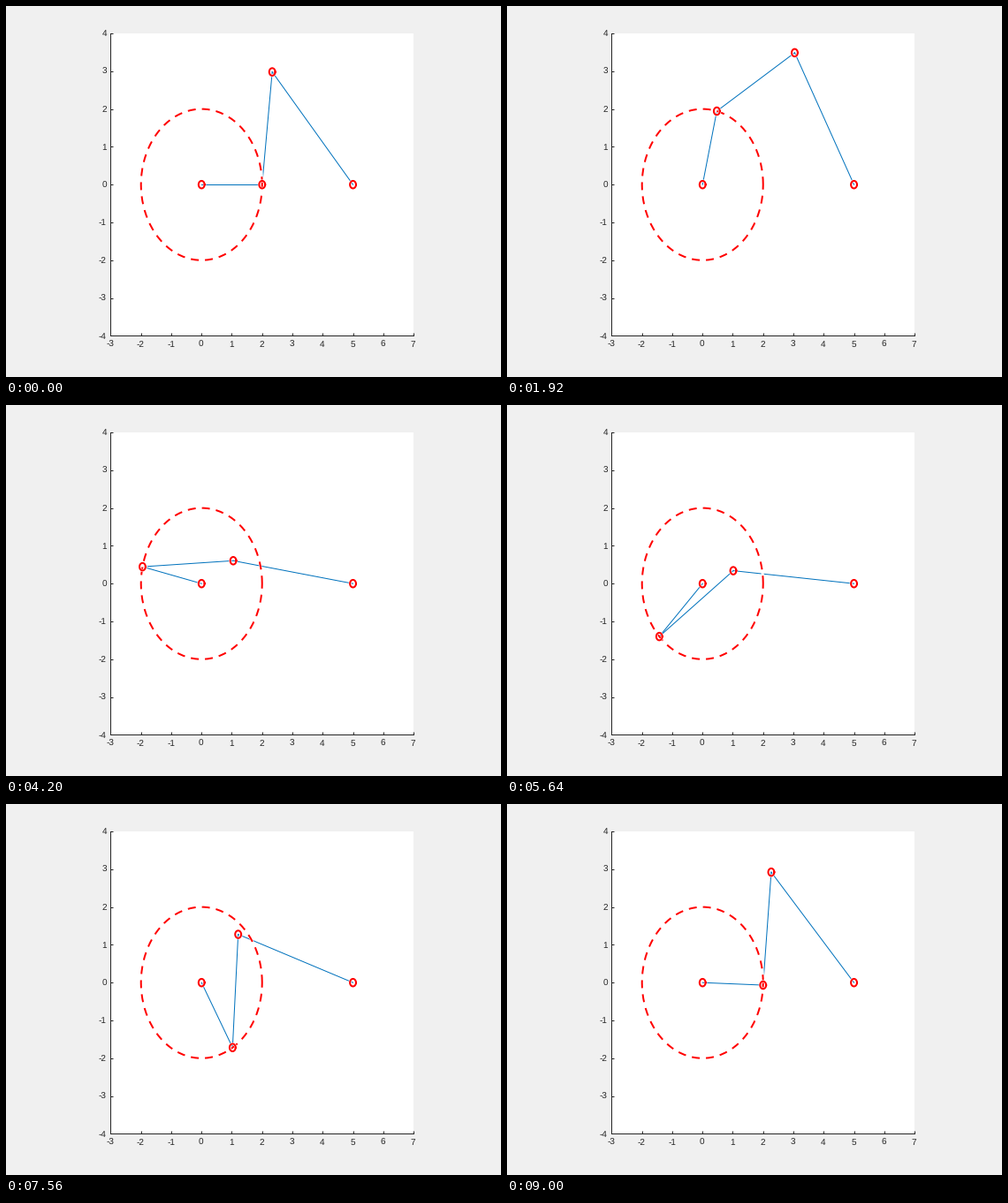
Recreate the animation shown at these times as a matplotlib script. Size 560 px wide and 420 px high, loop 9120 ms.

```python
import numpy as np
import matplotlib.pyplot as plt
from matplotlib.animation import FuncAnimation

W, H, DPI = 560, 420, 72
FRAMES, INTERVAL = 76, 120
STEP = 1 / 12                      # crank angle per frame, radians
CRANK, COUPLER, ROCKER, BASE = 2, 3, 4, 5
BLUE, RED, INK, GRAY = "#0072bd", "#ff0000", "0.15", "0.94"

plt.rcParams["font.family"] = "Liberation Sans"
plt.rcParams["text.hinting"] = "none"

fig = plt.figure(figsize=(W / DPI, H / DPI), dpi=DPI, facecolor=GRAY)
ax = fig.add_axes([118.45 / W, 46.6 / H, 342.6 / W, 342.4 / H], facecolor="white")
ax.set(xlim=(-3, 7), ylim=(-4, 4), xticks=range(-3, 8), yticks=range(-4, 5))
ax.spines[["top", "right"]].set_visible(False)
ax.spines[["left", "bottom"]].set(linewidth=1, color=INK)
ax.tick_params(direction="in", length=3.4, width=1, color=INK,
               labelbottom=False, labelleft=False)


def label(value, pos, shift, align):
    ax.annotate(str(value), pos, xytext=shift, textcoords="offset points",
                ha=align, va="baseline", size=10, color=INK,
                annotation_clip=False)


for v in range(-3, 8):
    label(v, (v, -4), (-0.4, -12.8), "center")
for v in range(-4, 5):
    label(v, (-3, v), (-4.6, -3.4), "right")

theta = np.linspace(0, 2 * np.pi, 181)
UNIT = np.array([np.cos(theta), np.sin(theta)])


def ring(radius, z, style="-"):
    """Red circle over a slightly wider white one."""
    pts = radius * UNIT
    return [ax.plot(*pts, color="white", lw=3, zorder=z)[0],
            ax.plot(*pts, color=RED, lw=2, ls=style, zorder=z + 0.1)[0]]


def place(lines, center, radius=0.1):
    for line in lines:
        line.set_data(center[0] + radius * UNIT[0], center[1] + radius * UNIT[1])


bars = [ax.plot([], [], color=BLUE, lw=1, zorder=2.1)[0] for _ in range(3)]
ring(CRANK, 2.3, (0, (4.5, 3.5)))
joints = [ring(0.1, 2.5 + 0.2 * i) for i in range(4)]


def linkage(angle):
    origin, pivot = np.zeros(2), np.array([BASE, 0.0])
    pin = CRANK * np.array([np.cos(angle), np.sin(angle)])
    gap = pivot - pin
    dist = np.hypot(*gap)
    along = (COUPLER**2 - ROCKER**2 + dist**2) / (2 * dist)
    rise = np.sqrt(COUPLER**2 - along**2)
    u = gap / dist
    knee = pin + along * u + rise * np.array([-u[1], u[0]])
    return [origin, pin, knee, pivot]


def draw(i):
    pts = linkage(i * STEP)
    for bar, a, b in zip(bars, pts, pts[1:]):
        bar.set_data([a[0], b[0]], [a[1], b[1]])
    for joint, p in zip(joints, pts):
        place(joint, p)
    return bars + [line for joint in joints for line in joint]


anim = FuncAnimation(fig, draw, frames=FRAMES, interval=INTERVAL,
                     init_func=lambda: draw(0), repeat=True, blit=False)
plt.show()
```
